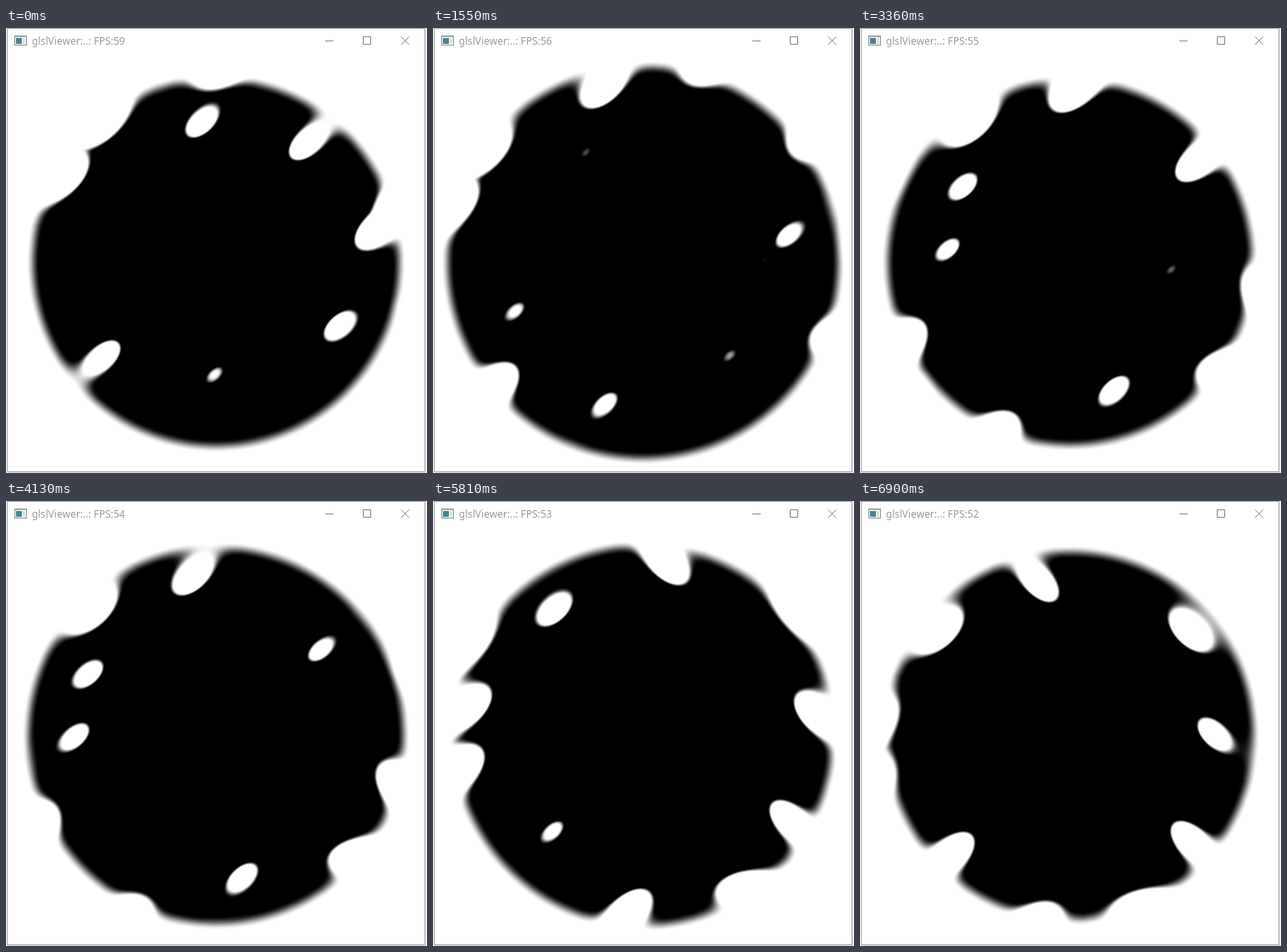
An HTML page with a canvas for the animation above (7000 ms loop, 505 by 533 pixels).

```html
<!DOCTYPE html>
<html>
<head>
<meta charset="utf-8">
<style>
html, body { margin: 0; width: 100%; height: 100%; overflow: hidden; background: #fff; }
canvas { position: absolute; left: 2px; top: 31px; }
svg { position: absolute; left: 0; top: 0; }
text { font: 12px "Noto Sans", "Open Sans", sans-serif; letter-spacing: .07px; fill: #999; }
</style>
</head>
<body>
<canvas id="view" width="500" height="500"></canvas>
<svg width="505" height="533" fill="none" stroke="#858585">
  <path d="M503.5 2V532.5H2" stroke="#e4e4e4"/>
  <rect x="1.5" y=".5" width="501" height="531" stroke="#a6a6a6"/>
  <rect x="10.5" y="9.5" width="14" height="11" fill="#f4f4f4" stroke="#8d9498"/>
  <path d="M11 10.5H24" stroke="#b4bcc0"/>
  <rect x="12" y="12" width="7" height="7" fill="#4b8589" stroke="none"/>
  <path d="M21.5 12V19" stroke="#c2c8ca"/>
  <path d="M383 15.5H393M428.5 10.5H437.5V19.5H428.5ZM474 10.5L483.5 20M483.5 10.5L474 20"/>
  <text id="caption" x="31" y="20" stroke="none"></text>
</svg>
<script>
const SIZE = 500, CX = 252, CY = 281;
const SOFT = 16, DEPTH = 90, LONG = 21, SHORT = 12;
const FPS = [59, 56, 56, 55, 54, 55, 53, 52];

// Peaks of one noise field that slides diagonally under the pulsing disc
const peaks = [
  [72, 178], [115, 114], [122, 389], [146, 302], [207, 190],
  [233, 117], [252, 412], [262, 42], [310, 264], [356, 143],
  [397, 357], [402, 5], [438, 245], [466, 217], [510, 92],
  [532, 335], [585, 250], [617, -48], [637, 125], [697, 5]
];

function smoothstep(lo, hi, x) {
  const k = Math.min(1, Math.max(0, (x - lo) / (hi - lo)));
  return k * k * (3 - 2 * k);
}

// Upper rows slide faster; peaks lean to the other side at the far right
function dentAt([x, y], t) {
  const lean = (42 - 87 * smoothstep(505, 565, x)) * Math.PI / 180;
  return {
    x: x - (27 + 18 * Math.exp(-y / 90)) * t,
    y: y + 22 * t,
    c: Math.cos(lean), s: Math.sin(lean)
  };
}

const ctx = view.getContext("2d");
const image = ctx.createImageData(SIZE, SIZE);
const pixels = new Uint32Array(image.data.buffer);

function draw(t) {
  const pulse = -Math.cos(2 * (t - .3));
  const R = 235 + 9 * pulse, depth = DEPTH * (1 - .08 * pulse);
  const dents = peaks.map(p => dentAt(p, t))
    .filter(d => Math.hypot(d.x - CX, d.y - CY) < 300);

  for (let j = 0, n = 0; j < SIZE; j++) {
    const y = j + 31.5;
    for (let i = 0; i < SIZE; i++, n++) {
      const x = i + 2.5;
      const r = Math.sqrt((x - CX) ** 2 + (y - CY) ** 2);
      let shade = r < R ? 0 : 255;
      if (r < R && r > R - SOFT - depth * 1.2) {
        let sum = 0;
        for (const d of dents) {
          const dx = x - d.x, dy = y - d.y;
          const u = (dx * d.c - dy * d.s) / LONG;
          const v = (dx * d.s + dy * d.c) / SHORT;
          const q = u * u + v * v;
          if (q < 12) sum += Math.exp(-2 * q);
        }
        // The fourth root makes a soft maximum of the dents
        const dent = depth * Math.sqrt(Math.sqrt(sum));
        shade = 255 * smoothstep(R - SOFT, R, r + dent) | 0;
      }
      pixels[n] = 0xff000000 | shade * 0x10101;
    }
  }
  ctx.putImageData(image, 0, 0);
  caption.textContent = "glslViewer:..: FPS:" + FPS[Math.floor(t + .22)];
}

const start = performance.now();
let shown = -1;
function tick() {
  const ms = Math.max(0, performance.now() - start) % 7000;
  const step = Math.min(6900, Math.floor(ms / 50) * 50);
  if (step !== shown) draw((shown = step) / 1000);
  requestAnimationFrame(tick);
}
tick();
</script>
</body>
</html>
```
